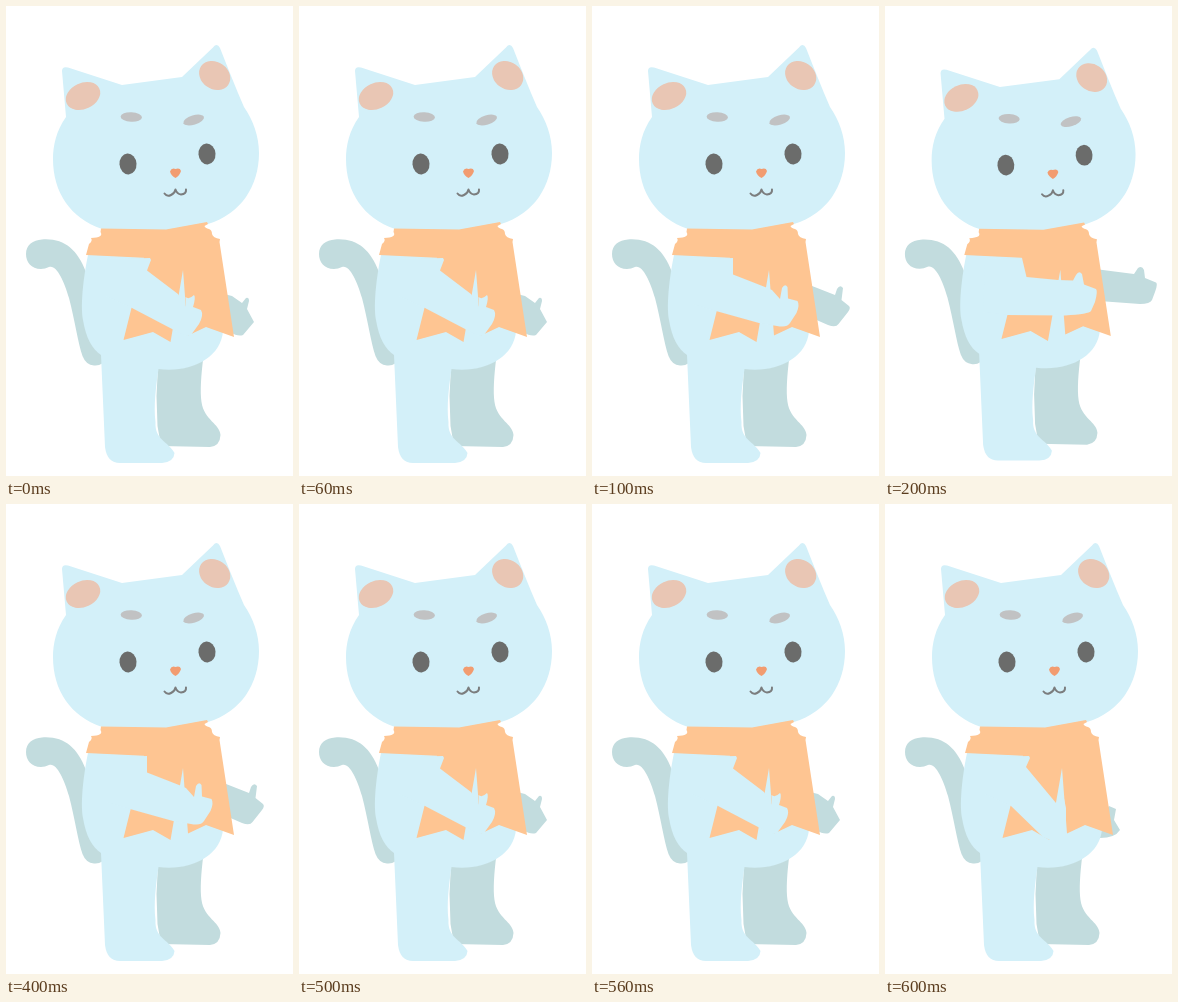
Animation, 287 px wide and 470 px high, one loop 0.7 s. Source, as an HTML page:

```html
<!DOCTYPE html>
<html lang="en">
<head>
<meta charset="utf-8">
<title>Waving cat</title>
<style>
  html, body { margin: 0; width: 100%; height: 100%; overflow: hidden; background: #fff; }
  svg { display: block; width: 100%; height: 100%; }
  .fur { fill: #d3f0f9; }
  .shade { fill: #c2dcde; }
  .scarf { fill: #fec592; }
  .ear { fill: #e9c6b4; }
  .brow { fill: #c1c2c3; }
  .eye { fill: #6b6c6b; }
  .nose { fill: #f29c70; }
  .mouth { fill: none; stroke: #7b7d7e; stroke-width: 2; stroke-linecap: round; stroke-linejoin: round; }
</style>
</head>
<body>
<svg viewBox="0 0 287 470">
  <path id="farArm" class="shade"/>
  <g id="cat">
    <!-- tail and far leg -->
    <path class="shade" d="M35 263C25 263 20 256 20 248C20 239 27 234 36 233.5C58 232 71 243 80 266L97 340L96 357.500Q93 360 88 359.500Q80 359 76.500 350C72 337 69 315 63 292C58 274 50 258 43 261Q39 263 35 263Z"/>
    <path class="shade" d="M152 360L197.500 350C195 370 194 385 195.500 396C198 414 214 418 214.500 429Q214 440 204 441L155 440L151.500 420L150.500 390Z"/>
    <!-- torso and near leg -->
    <path class="fur" d="M84 240C78 265 74 298 77 314C80 332 86 343 95 349L99 441Q101 457 114 457L156 457Q168 456 168.500 447C162 435 148.500 434 149.500 416C147.500 400 150 380 152.500 363C185 367 215 352 217 325L205 235Z"/>
    <!-- head -->
    <path class="fur" d="M60 111C50 125 47 140 47 153C47 186 64 212 96 223L160 225L202 218C235 208 253 180 253 147C253 130 247 114 238 101C230 83 222 62 214 42Q211 36.500 207 41.500L176 71L116 79L62 61.500Q56 60 56 65Z"/>
    <ellipse class="ear" rx="18" ry="13" transform="translate(77 90) rotate(-25)"/>
    <ellipse class="ear" rx="16.500" ry="13.500" transform="translate(208.700 69.500) rotate(35)"/>
    <ellipse class="brow" rx="10.700" ry="4.800" transform="translate(125.300 111) rotate(3)"/>
    <ellipse class="brow" rx="10.700" ry="4.600" transform="translate(187.700 114) rotate(-17)"/>
    <ellipse class="eye" rx="8.500" ry="10.500" transform="translate(122 158) rotate(-4)"/>
    <ellipse class="eye" rx="8.500" ry="10.500" transform="translate(201 148) rotate(-4)"/>
    <path class="nose" d="M164 165.500Q165.500 161.500 169.500 163Q174 161.500 175 165Q173.500 170 169.500 172Q165 169.500 164 165.500Z"/>
    <path class="mouth" d="M158.500 187.500Q161 191 165 189Q169 187 169.500 183.500Q171 188 175 188.500Q180.500 188 180 183.500"/>
    <!-- scarf: band, then the two hanging ends -->
    <path class="scarf" d="M95 222.500L160 223.500L201 216L202 218L198.500 220Q199 222 203 223Q206 224 206 228Q207 232 214 233L213.500 236L228 331L200 321L182 329.500L177 264L164.500 336L147 326L117.500 334L138 251.700L80 249L83 238Q87 235 85 232Q98 231.500 94.500 226Z"/>
  </g>
  <path id="nearArm" class="fur"/>
</svg>
<script>
const REST = "matrix(1 0 0 1 0 0)";
const SQUASH = "matrix(.99 0 0 .988 .1 3)";

const POSES = {
  down: {
    body: REST,
    near: "M100 253L144 252L145 254L141 263L171 299L178.500 292L181 304L181 328L165 336L158 333L126 302L100 290Z",
    far: "M224 302L231 305L229 316L235 326Q230 334 215 334L210 320Z"
  },
  low: {
    body: REST,
    near: "M100 253L144 252L145 254L141 264.500L172 288L180 301L179.500 291Q183 294 188 289Q190 291 187 301L195 304Q198 309 193 318L185 329Q181 332 167 323.500L126 302L100 290Z",
    far: "M218 288L226 290L236 297L240 292Q243 291 243 295L241 303L248 316L237 329Q232 331 224 326Z"
  },
  mid: {
    body: REST,
    near: "M100 253L141 252L141 268.500L173 281L180 284L188 293L190 282Q193 277 195.500 281L196 292.500L205.500 295Q208 299 204.500 307L198 317Q195 322 185 320L167 317L124 305L100 298Z",
    far: "M215 278L243 289L245 283Q248 278 251 282L249.500 294L257 300Q259 302 256 306L246.500 318Q244 322 236 319L220 312Z"
  },
  high: {
    body: SQUASH,
    near: "M100 253L137 252L141.500 271L173 274L188 274.500L191 269Q194 264 197 268L199 278.500L211 283Q213 285 210 296L206 305Q204 308 180 309.500L122 309L98 306Z",
    far: "M210 263L249 268L253 262Q257 259 259 264L260 272L271 276.500Q273 278 270 286L267 294Q265 298 255 298L214 295Z"
  }
};

const STEP = 100;
const ORDER = ["low", "mid", "high", "high", "mid", "low", "down"];
const [cat, nearArm, farArm] = ["cat", "nearArm", "farArm"].map(id => document.getElementById(id));

function draw(time) {
  const pose = POSES[ORDER[Math.floor(time / STEP) % ORDER.length]];
  cat.setAttribute("transform", pose.body);
  nearArm.setAttribute("d", pose.near);
  farArm.setAttribute("d", pose.far);
}

let start;
function tick(now) {
  start ??= now;
  draw(Math.max(0, now - start));
  requestAnimationFrame(tick);
}
draw(0);
requestAnimationFrame(tick);
</script>
</body>
</html>
```
